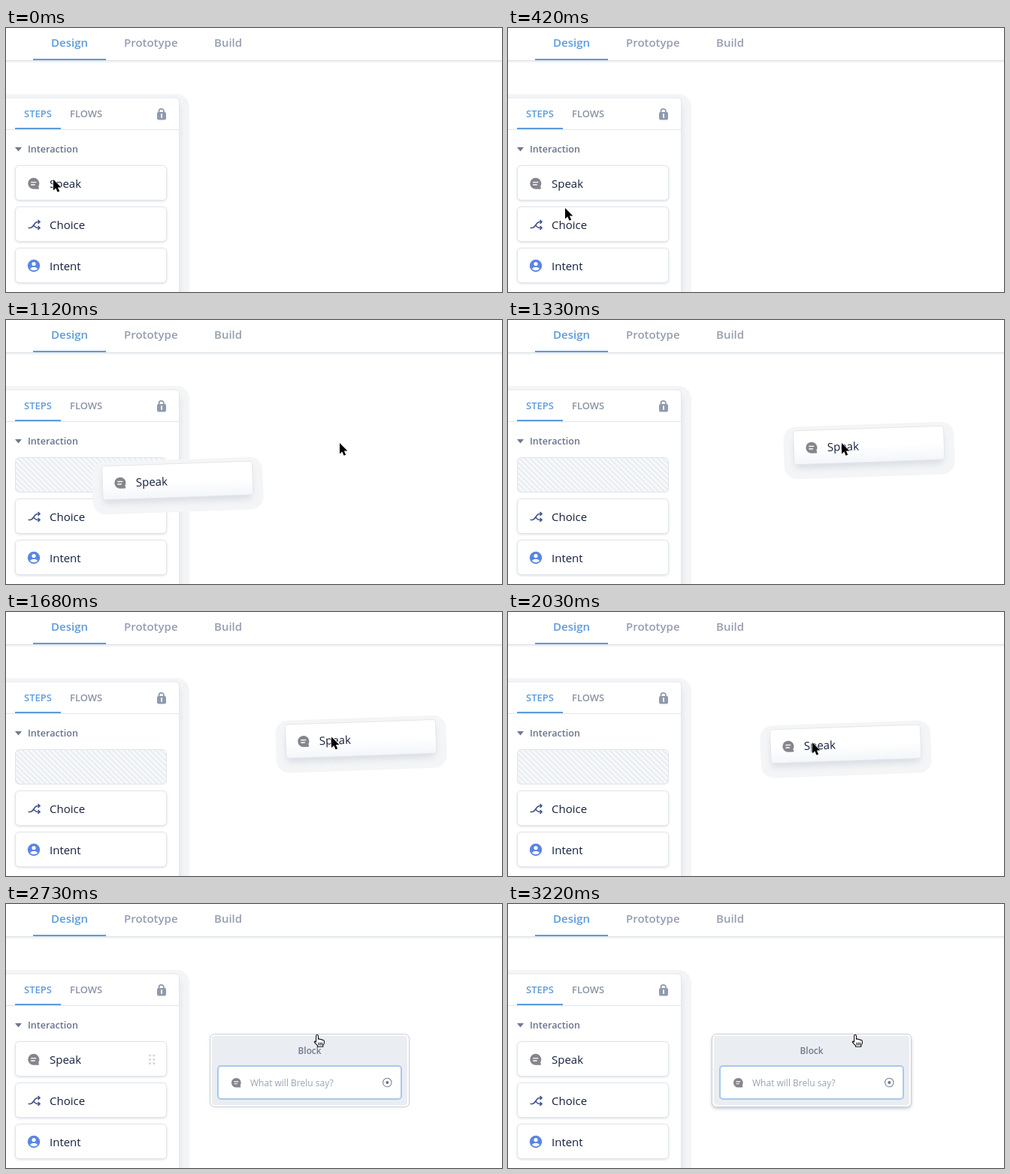
Animation of 660 by 352 pixels, one loop 6.3 s. Source, as an HTML page:

```html
<!DOCTYPE html>
<html lang="en">
<head>
<meta charset="utf-8">
<title>Drag a step</title>
<style>
html, body { margin: 0; width: 100%; height: 100%; overflow: hidden; background: #fff; }
svg { display: block; width: 100vw; height: 100vh; font-family: "Open Sans", sans-serif; }
.nav { font-size: 15px; font-weight: 600; fill: #969eb0; }
.tab { font-size: 13px; font-weight: 600; fill: #8a94a6; }
.label { font-size: 15px; fill: #15213c; }
.on { fill: #5d9bdc; }
.card { fill: #fff; stroke: #e0e4ea; filter: drop-shadow(0 1px 1.5px rgba(17, 49, 96, .16)); }
.halo { fill: #f4f5f6; filter: blur(.4px); }
.shade { fill: #d9dee5; filter: blur(4px); }
.hand { fill: #fff; stroke: #111; stroke-width: 1.1; stroke-linejoin: round; stroke-linecap: round; }
</style>
</head>
<body>
<svg viewBox="0 0 660 352">
  <defs>
    <pattern id="hatch" width="5" height="5" patternUnits="userSpaceOnUse" patternTransform="rotate(-45)">
      <rect width="5" height="5" fill="#f8fafb"/><rect width="2.4" height="5" fill="#e9edf1"/>
    </pattern>
    <linearGradient id="tint" x2="0" y2="1">
      <stop offset=".5" stop-color="#fff"/><stop offset="1" stop-color="#f3f6fa"/>
    </linearGradient>
    <g id="bubble">
      <path d="M0-7.5A7.5 7.5 0 1 0 0 7.5H6.2Q7.5 7.5 7.2 6L6.4 4A7.5 7.5 0 0 0 0-7.5Z" fill="#85868c"/>
      <path d="M-3.5-1.7H3.5M-3.5 1.7H2" stroke="#fff" stroke-width="1.4"/>
    </g>
    <rect id="slot" x=".5" y=".5" width="201" height="46" rx="5"/>
  </defs>

  <path d="M0 44.5H660" stroke="#f1f2f4" stroke-width="3"/>
  <path d="M0 43.5H660" stroke="#dfe2e6"/>
  <g class="nav">
    <text class="on" x="60" y="25">Design</text>
    <text x="157" y="25">Prototype</text>
    <text x="277" y="25">Build</text>
  </g>
  <path class="on" d="M36 41H133V43H36Z"/>

  <rect class="halo" x="-40" y="88" width="284" height="400" rx="17"/>
  <rect class="shade" x="-40" y="100" width="272" height="400" rx="8" opacity=".75"/>
  <rect x="-40" y="93" width="270.5" height="400" rx="5" fill="#fff" stroke="#e4e7eb"/>
  <path d="M0 135.5H230" stroke="#e2e5ea"/>
  <path class="on" d="M12 133H73V135H12Z"/>
  <text class="tab on" x="24" y="119">STEPS</text>
  <text class="tab" x="85" y="119">FLOWS</text>
  <path d="M203.5 113V111A3.2 3.2 0 0 1 209.9 111V113" fill="none" stroke="#8f9aae" stroke-width="1.8"/>
  <rect x="201" y="112" width="12" height="10.5" rx="2" fill="#8f9aae"/>
  <path d="M207 115V119" stroke="#fff" stroke-width="1.8" stroke-linecap="round"/>
  <path d="M12 159H21L16.5 164.5Z" fill="#6e7a90"/>
  <text x="29" y="166" font-size="12.6" font-weight="600" fill="#68748a">Interaction</text>

  <g id="empty" transform="translate(12 183)">
    <use href="#slot" fill="url(#hatch)" stroke="#dfe4ea"/>
  </g>
  <g id="speak" transform="translate(12 183)">
    <use class="card" href="#slot"/>
    <use href="#bubble" x="24.7" y="24.3"/>
    <text class="label" x="46" y="30">Speak</text>
    <path id="grip" d="M179.5 19v0M179.5 24.3v0M179.5 29.6v0M184.8 19v0M184.8 24.3v0M184.8 29.6v0"
      stroke="#b9bec7" stroke-width="3.2" stroke-linecap="round"/>
  </g>
  <g transform="translate(12 238)">
    <use class="card" href="#slot"/>
    <path d="M17.5 28.5H20C25 28.5 25 20.5 30 20.5H33M25.5 25.5Q27 28.5 30 28.5H33M30.5 18L33 20.5L30.5 23M30.5 26L33 28.5L30.5 31"
      fill="none" stroke="#41548f" stroke-width="1.6"/>
    <text class="label" x="46" y="30">Choice</text>
  </g>
  <g transform="translate(12 293)">
    <use class="card" href="#slot"/>
    <circle cx="25" cy="24" r="8.2" fill="#5a85e4"/>
    <circle cx="25" cy="21.5" r="2.6" fill="#fff"/>
    <path d="M20 28.2Q21 25.7 25 25.7T30 28.2Q28 30.3 25 30.3T20 28.2Z" fill="#fff"/>
    <text class="label" x="46" y="30">Intent</text>
  </g>

  <g id="block">
    <rect id="glow" x="271" y="175" width="266" height="98" rx="7" fill="#bfc6d0" style="filter:blur(2px)"/>
    <rect x="271.5" y="173.5" width="265" height="97" rx="6" fill="#fff" stroke="#c9ced6"/>
    <rect x="274" y="176" width="260" height="92" rx="4" fill="#eaedf2"/>
    <text x="404" y="200" text-anchor="middle" font-size="11.8" font-weight="600" fill="#717a8b">Block</text>
    <rect x="282" y="216" width="244" height="44" rx="4" fill="#fff" stroke="#a9c9ec" stroke-width="2"/>
    <use href="#bubble" transform="translate(306.3 238.3) scale(.84)"/>
    <text x="325" y="243" font-size="12" fill="#9aa3b2">What will Brelu say?</text>
    <circle cx="507.3" cy="238" r="5.7" fill="none" stroke="#7b8698" stroke-width="1.1"/>
    <circle cx="507.3" cy="238" r="2" fill="#6b768a"/>
  </g>

  <g id="drag">
    <rect class="halo" x="-13" y="-5" width="227" height="70" rx="17"/>
    <rect class="shade" x="1" y="8" width="198" height="43" rx="6"/>
    <rect x=".5" y=".5" width="200" height="45" rx="4" fill="url(#tint)" stroke="#e3e7ec"/>
    <use href="#bubble" x="24" y="23.5"/>
    <text class="label" x="45" y="29">Speak</text>
  </g>

  <g id="cursor">
    <path id="arrow" d="M0 0V14.4L3.3 11.4L5.6 16.8L8.2 15.7L5.9 10.4H10.4Z" stroke="#fff" stroke-width="1.2" paint-order="stroke"/>
    <g id="fist" class="hand">
      <path d="M-4.5-3Q-3.5-5.5-1.8-4.2Q-.3-6 1.2-4.2Q2.8-5.5 4-3.6Q6-4.3 6.2-2V1.5L4.6 4.2V6H-3V4.4L-5.6 1.2Q-6.4-1-4.5-1.2Z"/>
      <path d="M-1.8-4V-1.8M1.2-4V-1.8M4-3.4V-1.8"/>
    </g>
    <g id="point" class="hand">
      <path d="M-1.4 9V1Q-1.2-.8 0-.8T1.5 1V5.2Q3.3 4.2 4.3 5.8Q6 5 7 6.5Q9.2 6 9.4 8.2V10.8L7.8 13.4V15.2H.5V13.8L-3.7 8.8Q-4-6.2-1.4 9Z" style="display:none"/>
      <path d="M-1.4 9V1Q-1.2-.8 0-.8T1.5 1V5.2Q3.3 4.2 4.3 5.8Q6 5 7 6.5Q9.2 6 9.4 8.2V10.8L7.8 13.4V15.2H.5V13.8L-3.6 9.4Q-3.8 7-1.4 9Z"/>
      <path d="M2 10V13M4.2 10V13M6.4 10V13"/>
    </g>
  </g>
</svg>
<script>
const LOOP = 6300, STEP = 70;
const $ = id => document.getElementById(id);
const show = (id, on) => { $(id).style.display = on ? "" : "none"; };

// Keys are [time, ...values], joined by smooth steps.
function at(keys, t) {
  const i = keys.findIndex(k => k[0] > t);
  if (i < 0) return keys[keys.length - 1].slice(1);
  if (i === 0) return keys[0].slice(1);
  const a = keys[i - 1], b = keys[i];
  const p = (t - a[0]) / (b[0] - a[0]), e = p * p * (3 - 2 * p);
  return a.slice(1).map((v, n) => v + (b[n + 1] - v) * e);
}

const cursorPath = [
  [70, 63, 202], [420, 76, 240], [770, 101, 209],
  [1120, 444, 164], [1610, 444, 164], [1750, 422, 169],
  [1960, 422, 169], [2030, 405, 174], [2520, 405, 174],
  [2730, 414, 175], [3220, 462, 175]
];
const dragPath = [
  [840, 14, 186, 0], [910, 20, 188, -1], [1120, 127, 194.5, -2],
  [1190, 127, 194.5, -2], [1330, 379, 147.5, -2], [1610, 379, 147.5, -2],
  [1750, 363, 152, -2], [1960, 363, 152, -2], [2030, 348, 156.5, -2]
];
const gripFade = [[490, 0], [630, 1], [840, 1], [910, .6], [2730, .6], [3010, 0]];
const blockFade = [[2310, 0], [2450, 1]];
const glowFade = [[2730, .2], [3010, .9]];

function draw(now) {
  const t = Math.floor(now % LOOP / STEP) * STEP;
  const dragging = t >= 840 && t < 2170;
  const fist = t >= 630 && t < 910, point = t >= 2450;
  const [cx, cy] = at(cursorPath, t), [x, y, turn] = at(dragPath, t);

  show("speak", !dragging);
  show("empty", dragging);
  show("drag", dragging);
  show("fist", fist);
  show("point", point);
  show("arrow", !fist && !point);
  $("drag").setAttribute("transform", `translate(${x} ${y}) rotate(${turn})`);
  $("cursor").setAttribute("transform", `translate(${cx} ${cy})`);
  $("grip").style.opacity = at(gripFade, t);
  $("block").style.opacity = at(blockFade, t);
  $("glow").style.opacity = at(glowFade, t);
}

const start = performance.now();
function tick() {
  draw(performance.now() - start);
  requestAnimationFrame(tick);
}
tick();
</script>
</body>
</html>
```
